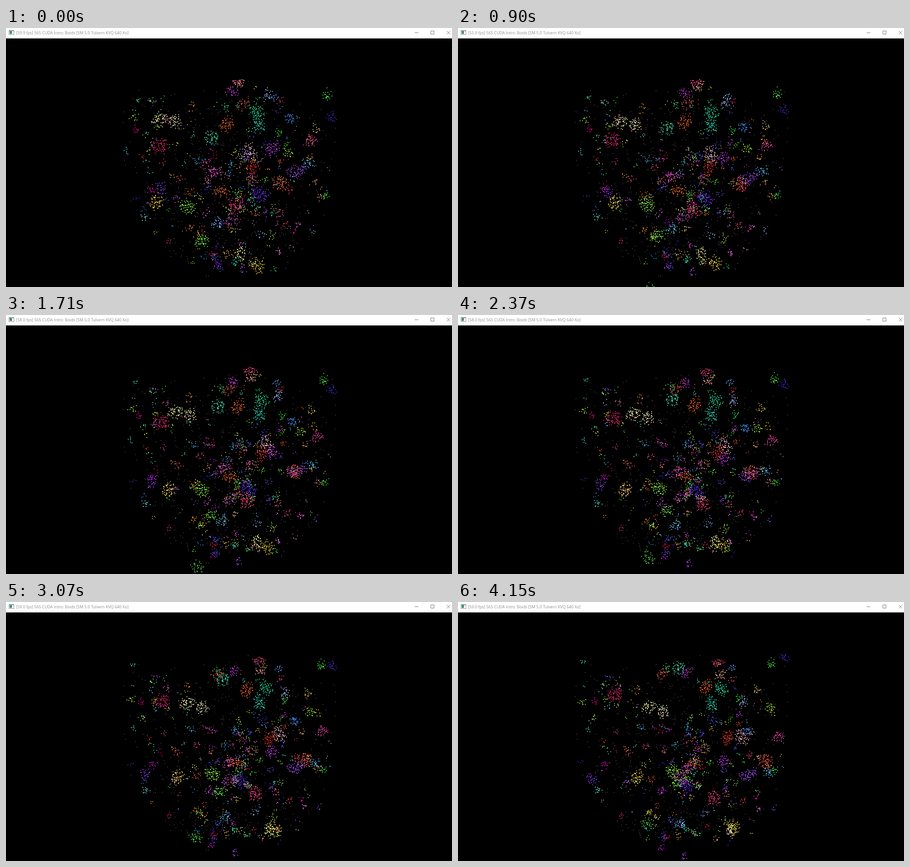
An HTML page with a canvas that plays this animation: 981 by 571 pixels, repeating every 4250 ms.

```html
<!DOCTYPE html>
<html lang="en">
<head>
<meta charset="utf-8">
<title>Boids</title>
<style>
  html, body { margin: 0; width: 100%; height: 100%; overflow: hidden; background: #000; }
  canvas { display: block; }
  #title {
    position: absolute; left: 22px; top: 0; line-height: 22px; white-space: pre;
    font-family: "Open Sans", "Noto Sans", sans-serif; font-size: 8.75px; color: #8c8c8c;
  }
</style>
</head>
<body>
<canvas id="stage" width="981" height="571"></canvas>
<div id="title"></div>
<script>
const ctx = document.getElementById('stage').getContext('2d');
const title = document.getElementById('title');
const LOOP = 4250, TOP = 113;

// Moments at which the simulation shows its next step
const steps = [0, 150, 270, 390, 510, 660, 780, 900, 1050, 1170, 1290, 1440, 1590, 1710, 1860, 1980,
  2130, 2250, 2370, 2520, 2640, 2790, 2920, 3070, 3190, 3340, 3460, 3610, 3760, 3880, 4000, 4150];

// Large flocks, biggest first: start x, y, end x, y, colour
const flocks = [
  [337, 258, 344, 203, '#f02a72'], [555, 365, 499, 403, '#6a2cff'],
  [503, 390, 562, 430, '#ff4488'], [640, 318, 638, 382, '#a850ff'],
  [603, 341, 676, 350, '#ff6248'], [397, 393, 472, 373, '#94ff42'],
  [452, 242, 484, 145, '#45d2a8'], [535, 273, 622, 297, '#ffc4d4'],
  [485, 212, 545, 186, '#ff6428'], [550, 182, 578, 190, '#24f5b0'],
  [555, 210, 557, 224, '#2af0c8'], [330, 383, 393, 386, '#ffdc48'],
  [540, 308, 590, 298, '#ff3526'], [338, 200, 420, 230, '#ffffad'],
  [495, 425, 485, 383, '#b850b0'], [455, 317, 505, 365, '#ff5cd0'],
  [553, 525, 606, 495, '#ffde2c'], [472, 358, 520, 352, '#ff7626'],
  [370, 203, 450, 240, '#fff4c0'], [515, 497, 600, 502, '#ffff96'],
  [520, 168, 448, 158, '#c8503f'], [583, 268, 583, 350, '#d040ff'],
  [427, 472, 480, 400, '#7cff4a'], [425, 602, 415, 488, '#58d850'],
  [668, 247, 703, 296, '#ff48b0'], [540, 335, 541, 323, '#b08050'],
  [508, 114, 570, 134, '#ff4b8c'], [513, 121, 577, 160, '#ffb298'],
  [625, 198, 637, 284, '#4a98ff'], [466, 430, 489, 488, '#68d8ff'],
  [665, 297, 683, 375, '#60c8ff'], [340, 350, 292, 387, '#9040ff'],
  [575, 147, 627, 220, '#a8ccff'], [620, 275, 686, 232, '#aaff2c'],
  [705, 148, 688, 136, '#4cff4c'], [716, 196, 718, 120, '#4a2cd8']
];

let seed = 565;
function rand() {
  seed = (seed + 0x6D2B79F5) | 0;
  let h = Math.imul(seed ^ seed >>> 15, 1 | seed);
  h = h + Math.imul(h ^ h >>> 7, 61 | h) ^ h;
  return ((h ^ h >>> 14) >>> 0) / 4294967296;
}
const spread = size => (rand() - 0.5) * size;

// Random place inside the swarm: flat on top, rounded below
function place() {
  const y = TOP + 2 + 440 * (0.85 * rand() + 0.15 * rand());
  const u = Math.max(0, (y - 180) / 390);
  const half = 235 * Math.sqrt(1 - u ** 3);
  return [492 + half * (rand() < 0.45 ? spread(2) : spread(1) + spread(1)), y];
}

const boids = [];
function addFlock(x, y, endX, endY, color, count) {
  const stretch = 0.75 + rand() * 0.6, tilt = rand() * Math.PI;
  const cos = Math.cos(tilt), sin = Math.sin(tilt), bend = spread(0.04);
  for (let k = 0; k < count; k++) {
    const r = 1.9 * Math.sqrt(k + 0.5), a = k * 2.4;
    const along = r * Math.cos(a) * stretch + spread(9);
    const across = r * Math.sin(a) / stretch + spread(7) + bend * along * along;
    const dx = along * cos - across * sin, dy = along * sin + across * cos;
    boids.push({
      x: x + dx * 1.1 + spread(5), y: y + dy * 1.1 + spread(5),
      endX: endX + dx, endY: endY + dy, color
    });
  }
}

for (let i = 0; i < 200; i++) {
  const [x, y] = place();
  const color = `hsl(${rand() * 360} ${65 + rand() * 35}% ${48 + rand() * 24}%)`;
  addFlock(x, y, x + spread(50), y + spread(60), color, 2 + Math.floor(rand() ** 1.6 * 13));
}
flocks.forEach((flock, i) => addFlock(...flock, Math.round(66 - 1.3 * i)));
const loners = Array.from({ length: 520 }, place);

function drawWindowBar() {
  ctx.fillStyle = '#fff';
  ctx.fillRect(0, 0, 981, 23);
  ctx.fillStyle = '#8a9298';
  ctx.fillRect(6, 5, 12, 10);
  ctx.fillStyle = '#fff';
  ctx.fillRect(7, 7, 10, 7);
  ctx.fillStyle = '#3c8f80';
  ctx.fillRect(8, 7, 5, 6);
  ctx.strokeStyle = '#777';
  ctx.lineWidth = 1;
  ctx.beginPath();
  ctx.moveTo(899, 10.5); ctx.lineTo(907, 10.5);
  ctx.rect(934.5, 6.5, 7, 7);
  ctx.moveTo(969.5, 6.5); ctx.lineTo(977, 14);
  ctx.moveTo(977, 6.5); ctx.lineTo(969.5, 14);
  ctx.stroke();
}

function dot(x, y, size) {
  if (y >= TOP) ctx.fillRect(Math.round(x), Math.round(y), size, size);
}

const start = performance.now();
let shown = -1;
function frame() {
  const t = (performance.now() - start) % LOOP;
  const step = steps.findLastIndex(s => s <= t);
  if (step !== shown) {
    shown = step;
    const p = step / (steps.length - 1);
    ctx.fillStyle = '#000';
    ctx.fillRect(0, 0, 981, 571);
    ctx.fillStyle = '#666';
    for (const [x, y] of loners) dot(x, y, 1.3);
    for (const b of boids) {
      ctx.fillStyle = b.color;
      dot(b.x + (b.endX - b.x) * p, b.y + (b.endY - b.y) * p, 1.75);
    }
    drawWindowBar();
    const fps = t < 390 ? '59.9' : t < 1440 ? '55.9' : t < 2520 ? '58.0' : '59.0';
    title.textContent = `[${fps} fps] 565 CUDA Intro: Boids [SM 5.0 Tulvern KVQ 640 Xo]`;
  }
  requestAnimationFrame(frame);
}
frame();
</script>
</body>
</html>
```
